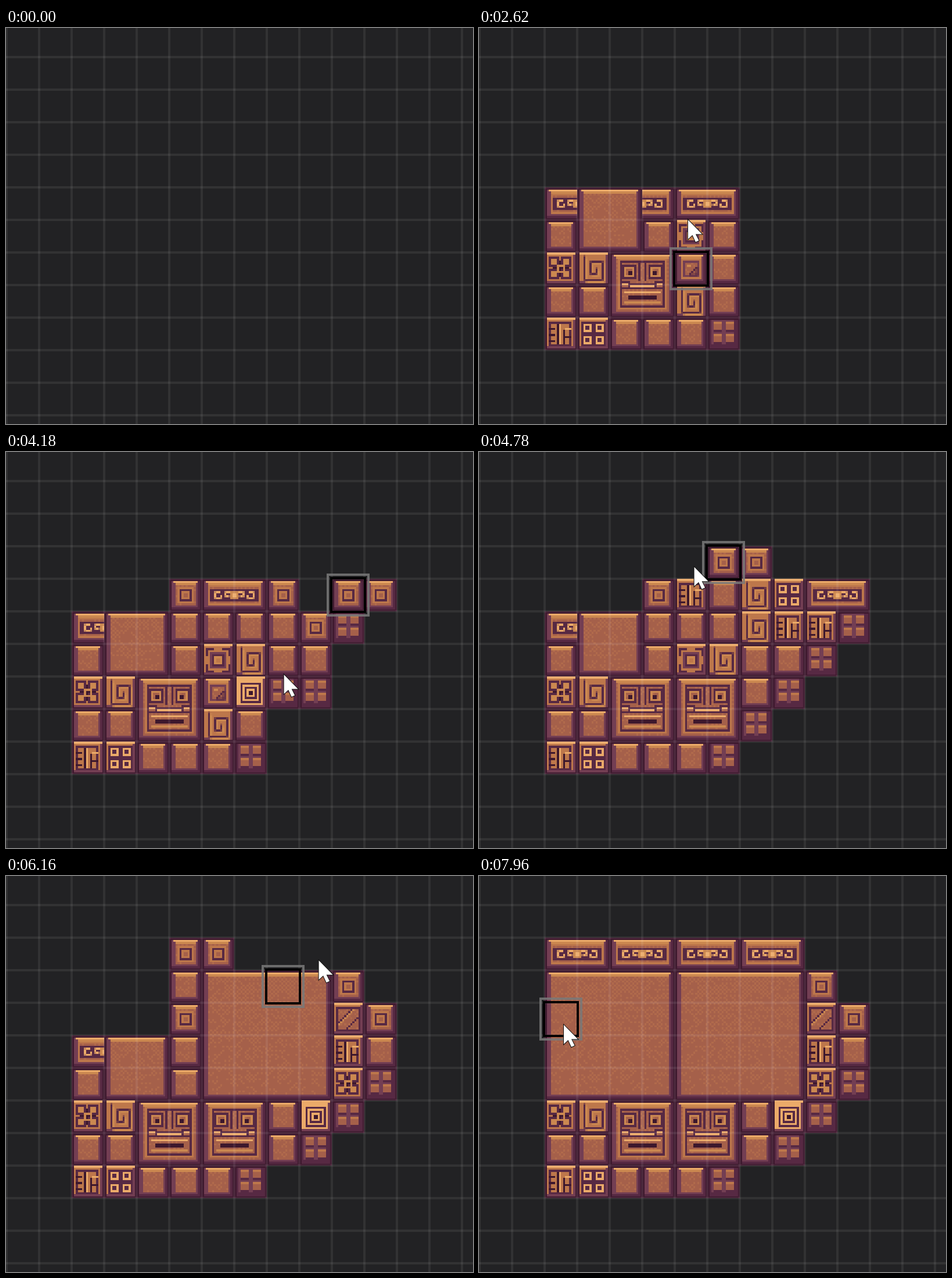
Write an HTML page with a canvas that moves like this. It is 804 px wide and 681 px high and loops after 8 s.

```html
<!DOCTYPE html>
<html>
<head>
<meta charset="utf-8">
<style>
  html, body { margin: 0; width: 804px; height: 681px; overflow: hidden; background: #222224; }
  canvas { display: block; }
</style>
</head>
<body>
<canvas id="stage" width="804" height="681"></canvas>
<script>
const CELL = 56, PX = 16, LEFT = 1, TOP = 50;
const DARK = '#3d182d', SHADE = '#572943', PURPLE = '#733e53', FACE = '#a5604a',
      WARM = '#b06a4c', CLAY = '#bd774b', MID = '#cb8850', LIGHT = '#ebaa69';
const SIZE = { 2: [2, 2], 4: [4, 4], M: [2, 2], F: [2, 1] };
const sizeOf = type => SIZE[type] || [1, 1];

// ---- Tile art, drawn on a 16 px cell ----
function fill(c, color, x, y, w, h = w) {
  c.fillStyle = color;
  c.fillRect(x, y, w, h);
}
function frame(c, color, x, y, w, h = w) {
  c.strokeStyle = color;
  c.strokeRect(x + 0.5, y + 0.5, w - 1, h - 1);
}
function line(c, color, path) {
  c.strokeStyle = color;
  c.stroke(new Path2D(path));
}
const ring = (c, color, inset) => frame(c, color, inset, inset, PX - 2 * inset);

function mirrored(c, width, draw) {
  draw();
  c.translate(width, 0);
  c.scale(-1, 1);
  draw();
  c.resetTransform();
}
function corners(draw) {
  for (const x of [3, 9]) for (const y of [3, 9]) draw(x, y);
}
function grain(c, x, y, w, h) {
  fill(c, FACE, x, y, w, h);
  let seed = 7;
  for (let j = 0; j < h; j++) for (let i = j % 2; i < w; i += 2) {
    seed = seed * 16807 % 2147483647;
    if (seed / 2147483647 < 0.8 - 0.5 * j / h) fill(c, WARM, x + i, y + j, 1);
  }
}
function bevel(c, w, h) {
  fill(c, DARK, 0, 0, w, h);
  fill(c, SHADE, 1, 1, w - 2, h - 2);
  fill(c, PURPLE, 1, 1, w - 3, h - 3);
  grain(c, 3, 2, w - 6, h - 5);
  fill(c, LIGHT, 2, 1, w - 4, 1);
  fill(c, MID, 3, 2, w - 6, 1);
}
function plate(c, color = CLAY) {
  fill(c, DARK, 0, 0, PX);
  fill(c, PURPLE, 1, 1, 14);
  fill(c, color, 1, 1, 13);
  fill(c, LIGHT, 1, 0, 14, 1);
}
// Square spiral winding inwards: down, right, up, left, ...
function spiral(c, color, x, y, length) {
  let path = `M${x} ${y}`;
  for (let turn = 0; length > 0; turn++) {
    path += (turn % 2 ? 'h' : 'v') + (turn % 4 < 2 ? length : -length);
    if (turn % 2 === 0) length -= 3;
  }
  line(c, color, path);
}

const art = {
  p: c => bevel(c, 16, 16),
  2: c => bevel(c, 32, 32),
  4: c => bevel(c, 64, 64),
  o(c) {
    bevel(c, 16, 16);
    ring(c, CLAY, 4);
    ring(c, SHADE, 5);
    ring(c, CLAY, 6);
  },
  c(c) {
    fill(c, DARK, 0, 0, PX);
    fill(c, SHADE, 1, 1, 14);
    fill(c, PURPLE, 2, 1, 11, 12);
    corners((x, y) => {
      fill(c, SHADE, x, y - 1, 4, 5);
      fill(c, FACE, x, y - 1, 4);
      fill(c, CLAY, x, y - 1, 4, 1);
    });
  },
  S(c) {
    plate(c);
    spiral(c, MID, 4.5, 2.5, 12);
    spiral(c, SHADE, 3.5, 1.5, 12);
  },
  e(c) {
    plate(c);
    frame(c, SHADE, 2, 2, 11, 12);
    for (let y = 5.5; y < 13; y += 3) line(c, DARK, `M2 ${y}h3`);
    line(c, DARK, 'M6.5 3V13 M9.5 6V13 M9 9.5H13');
    line(c, LIGHT, 'M7.5 3V13 M10 5.5H13');
  },
  d(c) {
    plate(c);
    corners((x, y) => {
      frame(c, SHADE, x - 1, y - 1, 6);
      frame(c, LIGHT, x, y, 4);
      fill(c, SHADE, x + 1, y + 1, 2);
    });
  },
  x(c) {
    plate(c);
    corners((x, y) => {
      frame(c, SHADE, x - 1, y - 1, 5);
      fill(c, MID, x, y, 3);
    });
    fill(c, DARK, 7, 4, 1, 8);
    fill(c, DARK, 4, 7, 8, 1);
    ring(c, MID, 6);
  },
  w(c) {
    plate(c);
    ring(c, SHADE, 2);
    fill(c, CLAY, 6, 2, 4, 12);
    fill(c, CLAY, 2, 6, 12, 4);
    ring(c, PURPLE, 4);
    ring(c, SHADE, 5);
    ring(c, MID, 6);
  },
  q(c) {
    plate(c, LIGHT);
    ring(c, SHADE, 3);
    ring(c, SHADE, 5);
    fill(c, DARK, 7, 7, 2);
  },
  t(c) {
    bevel(c, 16, 16);
    ring(c, CLAY, 3);
    ring(c, PURPLE, 4);
    line(c, SHADE, 'M7 11L11 7V11Z');
    fill(c, MID, 6, 6, 2, 1);
  },
  z(c) {
    plate(c);
    ring(c, SHADE, 2);
    grain(c, 3, 3, 10, 10);
    line(c, SHADE, 'M3 10L10 3 M7 13L13 7');
    line(c, MID, 'M3 11L11 3');
  },
  m(c) {
    plate(c);
    ring(c, SHADE, 2);
    mirrored(c, 16, () => {
      frame(c, SHADE, 4, 3, 4);
      fill(c, SHADE, 3, 8, 5, 5);
      fill(c, LIGHT, 4, 8, 2, 1);
      fill(c, MID, 5, 10, 3, 2);
    });
  },
  F(c) {
    bevel(c, 32, 16);
    frame(c, CLAY, 3, 3, 26, 10);
    fill(c, SHADE, 4, 5, 24, 6);
    mirrored(c, 32, () => {
      line(c, LIGHT, 'M9 6.5H6.5V9.5H9.5V8 M14 6.5H11.5V8.5H13.5');
      fill(c, MID, 14, 6, 2, 4);
    });
    fill(c, LIGHT, 15, 7, 2);
  },
  M(c) {
    bevel(c, 32, 32);
    frame(c, CLAY, 4, 3, 24, 25);
    frame(c, SHADE, 5, 4, 22, 23);
    mirrored(c, 32, () => {
      frame(c, SHADE, 6, 6, 7);
      frame(c, MID, 7, 7, 5);
      fill(c, DARK, 9, 9, 2);
      line(c, SHADE, 'M14.5 5V14 M10 15.5H16 M6 14.5H9 M9.5 14V17');
      line(c, LIGHT, 'M10 16.5H16 M6 15.5H9 M7 19.5H16');
      fill(c, SHADE, 6, 17, 10, 1);
      fill(c, DARK, 9, 21, 7, 2);
      fill(c, MID, 7, 24, 9, 1);
    });
  }
};

const sprites = {};
for (const type in art) {
  const sheet = document.createElement('canvas');
  [sheet.width, sheet.height] = sizeOf(type).map(n => n * PX);
  art[type](sheet.getContext('2d'));
  sprites[type] = sheet;
}

// ---- Painting stages: pointer legs and scribble in cells, tile map reached at tick `end` ----
// Maps start at column 2, row 1; dots continue a larger tile, h and H are half friezes.
const foot = ['xSM.M.pqc', 'pp....pc', 'edpppc'];
const stages = [
  { end: 21, legs: [[3.8, 6.4], [6.4, 7.9], [6.41, 5]], swing: [1.6, 1.4], turns: 5.5,
    rows: ['', '', '', 'h2.HF.', 'p..pwp', 'xSM.tp', 'pp..Sp', 'edpppc'] },
  { end: 36, legs: [[6.6, 3.7], [8.3, 6.5], [8.95, 6.29]], swing: [1.6, -0.8], turns: 4,
    rows: ['', '', '   oF.o', 'h2.pppp', 'p..pwSp', 'xSM.tqc', 'pp..Sp', 'edpppc'] },
  { end: 57, legs: [[9.6, 5.2], [9.3, 3.4], [6.6, 2.64]], swing: [1.5, -1.6], turns: 5,
    rows: ['', '     oo', '   oepSdF.', 'h2.pppSeec', 'p..pwSppc', 'xSM.M.pc', 'pp....c', 'edpppc'] },
  { end: 69, legs: [[10, 3.4], [9.2, 7.2], [8.41, 4.64]], swing: [1.2, 0.8], turns: 3,
    rows: ['', '    4...o', '   o....zo', 'h2.p....ep', 'p..p....xc', ...foot] },
  { end: 91, legs: [[5.5, 2], [9.6, 1.7], [5, 1.6], [2.95, 3.84]], swing: [0.6, 0.6], turns: 5,
    rows: ['   oF.F.', ' mpz4...o', '   p....zo', 'h2.p....ep', 'p..p....xc', ...foot] },
  { end: 110, legs: [[3.6, 2.4], [3.2, 2.6], [2.59, 3.68]], swing: [0.9, 1.1], turns: 5,
    rows: ['F.F.F.F.', '4...4...o', '........zo', '........ep', '........xc', ...foot] }
];
let begin = 0, origin = [6.45, 11.2];
for (const s of stages) {
  s.begin = begin;
  s.points = [origin, ...s.legs];
  begin = s.end;
  origin = s.legs[s.legs.length - 1];
}

// Each leg speeds up towards its end; the scribble fades out at both ends of a stage.
function pointer(tick) {
  const { begin, end, legs, points, swing, turns } = stages.find(s => tick <= s.end);
  const u = (tick - begin) / (end - begin);
  const i = Math.min(Math.floor(u * legs.length), legs.length - 1);
  const ease = (u * legs.length - i) ** 3;
  const wave = Math.sin(Math.PI * u) ** 2 * Math.sin(2 * Math.PI * turns * u);
  return [0, 1].map(k =>
    points[i][k] + (points[i + 1][k] - points[i][k]) * ease + swing[k] * wave);
}

const visited = {};
for (let tick = 4; tick <= 110; tick += 0.05) {
  const key = pointer(tick).map(Math.floor).join();
  if (!(key in visited)) visited[key] = tick;
}

// ---- Rendering ----
const ctx = document.getElementById('stage').getContext('2d');
const arrow = new Path2D('M0 0V33L7.5 26L13 38L18.5 35.5L13 24.5H24Z');
const at = (rows, x, y) => ((rows[y - 1] || '')[x - 2] || ' ');

function eachTile(rows, draw) {
  rows.forEach((row, j) => [...row].forEach((type, i) => {
    if (type !== ' ') draw(type, i + 2, j + 1);
  }));
}
function drawTile(type, x, y) {
  if (type === '.') return;
  const px = LEFT + x * CELL, py = TOP + y * CELL;
  if (type === 'h' || type === 'H') {
    ctx.drawImage(sprites.F, type === 'H' ? PX : 0, 0, PX, PX, px, py, CELL, CELL);
  } else {
    const [w, h] = sizeOf(type);
    ctx.drawImage(sprites[type], px, py, w * CELL, h * CELL);
  }
}

function drawTiles(tick) {
  const k = stages.findIndex(s => tick <= s.end);
  const { rows, end } = stages[k], before = k ? stages[k - 1].rows : [];
  const painted = (x, y) => at(rows, x, y) !== ' ' &&
    (tick === end || at(before, x, y) !== ' ' || visited[[x, y]] <= tick - 1);
  // A tile takes its final look once every cell in and around it is painted.
  const settled = (type, x, y) => {
    const [w, h] = sizeOf(type);
    for (let j = y - 1; j <= y + h; j++) for (let i = x - 1; i <= x + w; i++)
      if (at(rows, i, j) !== ' ' && !painted(i, j)) return false;
    return true;
  };
  if (tick < end) {
    eachTile(rows, (type, x, y) => {
      if (!painted(x, y) || at(before, x, y) !== ' ') return;
      drawTile(!painted(x, y - 1) ? 'o' : !painted(x, y + 1) ? 'c' : 'p', x, y);
    });
    eachTile(before, drawTile);
  }
  eachTile(rows, (type, x, y) => {
    if (type !== '.' && settled(type, x, y)) drawTile(type, x, y);
  });
}

function drawGrid() {
  const tint = 'rgba(255,255,255,.07)';
  for (let x = LEFT; x < 804; x += CELL) fill(ctx, tint, x - 2, 0, 4, 681);
  for (let y = TOP; y < 681; y += CELL) fill(ctx, tint, 0, y - 2, 804, 4);
}

function drawCursorCell(tick) {
  const [col, row] = pointer(tick).map(Math.floor);
  const outline = (color, margin) => {
    ctx.strokeStyle = color;
    ctx.strokeRect(LEFT + col * CELL - margin, TOP + row * CELL - margin,
      CELL + 2 * margin, CELL + 2 * margin);
  };
  ctx.lineWidth = 4;
  outline('rgba(122,122,122,.85)', 7);
  outline('#000', 1);
}

function drawArrow(tick) {
  const [x, y] = pointer(tick);
  ctx.save();
  ctx.translate(LEFT + x * CELL, TOP + y * CELL);
  ctx.lineWidth = 2;
  ctx.strokeStyle = '#111';
  ctx.stroke(arrow);
  ctx.fillStyle = '#fff';
  ctx.fill(arrow);
  ctx.restore();
}

function render() {
  const time = performance.now() % 8000;
  const tick = Math.max(0, Math.min(110, Math.floor((time - 1360) / 60)));
  ctx.imageSmoothingEnabled = false;
  fill(ctx, '#222224', 0, 0, 804, 681);
  drawTiles(tick);
  drawGrid();
  if (tick > 0) drawCursorCell(tick - 1);
  if (time >= 100) drawArrow(tick);
  requestAnimationFrame(render);
}
render();
</script>
</body>
</html>
```
